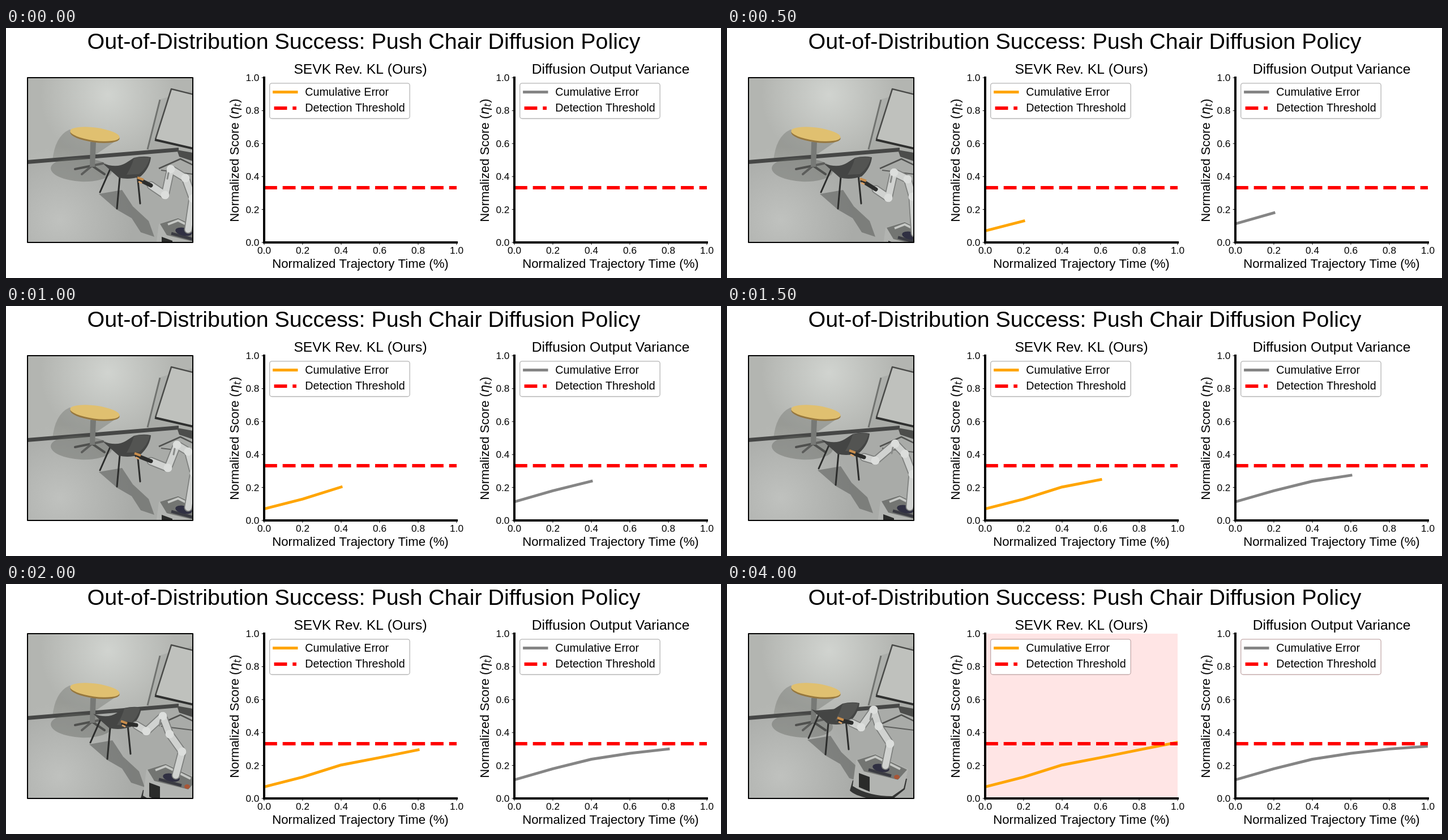
An HTML page with a canvas for the animation above (5000 ms loop, 1263x443 px).

```html
<!DOCTYPE html>
<html lang="en">
<head>
<meta charset="utf-8">
<title>Push chair policy</title>
<style>
html, body { margin: 0; width: 100%; height: 100%; overflow: hidden; background: #fff; }
canvas { display: block; }
</style>
</head>
<body>
<canvas id="stage" width="1263" height="443"></canvas>
<script>
const ctx = document.getElementById('stage').getContext('2d');
const SANS = '"Liberation Sans", Arial, sans-serif';
const MATH = 'italic "DejaVu Sans", sans-serif';
const LOOP = 5000, STEP = 500, LAST = 5;
const W = 340, H = 292, TOP = 88, BOTTOM = 380;
const PT = 1.233; // pixels per point
const DASH = [18.5 * PT, 8 * PT];

const charts = [
  { x: 456, title: 'SEVK Rev. KL (Ours)', color: '#ffa500', alarm: true,
    data: [.07, .13, .203, .248, .295, .341] },
  { x: 898, title: 'Diffusion Output Variance', color: '#858585',
    data: [.113, .18, .238, .274, .3, .317] }
];

// One pose per step: chair offset, base offset, arm joints from the gripper on
const poses = [
  { chair: [0, 0], base: [42, 35], arm: [[236, 269], [256, 279], [281, 296], [291, 250], [317, 266], [330, 302]] },
  { chair: [0, 0], base: [52, 42], arm: [[239, 271], [263, 286], [285, 301], [295, 256], [319, 268], [328, 299]] },
  { chair: [0, 0], base: [42, 35], arm: [[231, 265], [256, 275], [286, 287], [302, 246], [322, 258], [332, 296]] },
  { chair: [-4, -3], base: [43, 34], arm: [[220, 260], [242, 268], [262, 274], [297, 244], [314, 262], [328, 298]] },
  { chair: [-17, -10], base: [20, 17], arm: [[207, 247], [230, 250], [248, 261], [277, 234], [289, 266], [311, 297]] },
  { chair: [-22, -18], base: [0, 0], arm: [[199, 241], [220, 246], [237, 254], [259, 223], [268, 252], [288, 283]] }
];

function line(points, color, width, cap = 'butt', dash = []) {
  ctx.beginPath();
  points.forEach(p => ctx.lineTo(...p));
  ctx.strokeStyle = color;
  ctx.lineWidth = width;
  ctx.lineCap = cap;
  ctx.lineJoin = 'round';
  ctx.setLineDash(dash);
  ctx.stroke();
  ctx.setLineDash([]);
}

function fill(path, color) {
  ctx.fillStyle = color;
  ctx.fill(new Path2D(path));
}

function oval(x, y, rx, ry, turn, color) {
  ctx.beginPath();
  ctx.ellipse(x, y, rx, ry, turn, 0, 7);
  ctx.fillStyle = color;
  ctx.fill();
}

function text(str, x, y, size, align = 'center', italic = false) {
  ctx.font = italic ? MATH.replace(' ', ` ${size}px `) : `${size}px ${SANS}`;
  ctx.textAlign = align;
  ctx.fillStyle = '#000';
  ctx.fillText(str, x, y);
  return ctx.measureText(str).width;
}

function glow(x, y, r, rgb, alpha) {
  const g = ctx.createRadialGradient(x, y, 0, x, y, r);
  g.addColorStop(0, `rgba(${rgb},${alpha})`);
  g.addColorStop(1, `rgba(${rgb},0)`);
  ctx.fillStyle = g;
  ctx.fillRect(38, 88, 292, 292);
}

function room() {
  fill('M38 88H330V380H38Z', '#b3b5b1');
  glow(180, 118, 120, '212,215,211', .9);
  fill('M273 126L330 110V222L250 218Z', 'rgba(150,152,148,.35)');
  // Wall shadow, floor and skirting
  fill('M112 180Q86 192 82 236L150 230L200 196Z', 'rgba(110,112,108,.4)');
  fill('M38 240L305 217L330 219V380H38Z', '#a9aba8');
  glow(95, 340, 130, '194,196,193', .9);
  fill('M38 234L305 212V219L38 241Z', '#464746');
  line([[272, 127], [250, 215]], '#70726f', 3);
  // Board with its stand
  fill('M292 108L330 117V213L264 197Z', '#bfc1bd');
  line([[332, 118], [292, 108], [264, 197]], '#4a4b49', 2.5);
  line([[263, 198], [332, 214]], '#2f302f', 4);
  fill('M302 216L330 221V236L306 228Z', '#4c4d4b');
  line([[270, 249], [308, 232], [331, 243]], '#50514f', 2.5);
  line([[274, 252], [330, 259]], '#5c5d5b', 2);
}

function table() {
  oval(133, 251, 54, 21, .05, 'rgba(95,97,94,.4)');
  line([[122, 250], [152, 244], [174, 259]], '#4f504e', 4, 'round');
  line([[134, 259], [152, 244], [171, 240]], '#5c5d5b', 4, 'round');
  fill('M149 202H159L157 246H148Z', '#777976');
  oval(157, 190.5, 44, 12, .13, '#96773e');
  oval(157, 188, 44, 11.5, .13, '#e0c070');
}

function chair([dx, dy]) {
  ctx.save();
  ctx.translate(dx, dy);
  fill('M164 294L205 287L224 316L252 342L262 370L238 362L222 337L196 322Z', 'rgba(80,82,80,.5)');
  line([[184, 250], [166, 291]], '#2c2d2c', 3, 'round');
  line([[201, 264], [196, 320]], '#2c2d2c', 3, 'round');
  line([[232, 260], [237, 311]], '#2c2d2c', 3, 'round');
  fill('M171 240Q196 249 212 239L226 230Q242 226 256 229Q254 248 238 263Q217 270 199 265Q182 250 171 240Z', '#444544');
  fill('M226 231Q242 227 254 230Q250 247 235 259L213 260Q221 247 226 231Z', '#535452');
  ctx.restore();
}

function cart([dx, dy]) {
  ctx.save();
  ctx.translate(dx, dy);
  fill('M222 348L217 366Q230 380 288 385L314 364L318 345Z', '#343534');
  fill('M228 312L262 301L320 328L312 362L292 376Q250 376 222 358Z', '#b2b4b1');
  fill('M230 312L262 302L318 329L302 347L242 332Z', '#737572');
  fill('M233 335L252 342V368L233 360Z', '#2a2b2a');
  line([[244, 313], [262, 306], [306, 328]], '#c6c8c5', 4);
  line([[250, 329], [290, 340]], '#3a3b42', 5);
  oval(272, 326, 15, 7, .2, '#303042');
  oval(300, 342, 5, 4, 0, '#a85535');
  ctx.restore();
}

function robot({ arm, base }) {
  cart(base);
  const [tip, wrist, ...joints] = arm;
  const links = [wrist, ...joints, [280 + base[0], 322 + base[1]]];
  line(links, '#7d7f7d', 15, 'round');
  line(links, '#d0d2d0', 11.5, 'round');
  joints.forEach(([x, y]) => oval(x, y, 7.5, 7.5, 0, '#dcdedc'));
  const [ex, ey] = joints[1];
  line([[ex - 4, ey + 7], [ex - 6, ey + 17]], '#888a88', 3, 'round');
  line([tip, wrist], '#2c2d2c', 7, 'round');
  line([[tip[0] - 4, tip[1] - 4], [tip[0] + 7, tip[1]]], '#c88d4c', 4);
  line([[tip[0] - 2, tip[1] + 3], [tip[0] + 4, tip[1] + 6]], '#d9a269', 3);
}

function photo(step) {
  ctx.save();
  ctx.beginPath();
  ctx.rect(38, 88, 292, 292);
  ctx.clip();
  room();
  table();
  chair(poses[step].chair);
  robot(poses[step]);
  ctx.restore();
  ctx.strokeStyle = '#000';
  ctx.lineWidth = 2;
  ctx.strokeRect(38, 88, 292, 292);
}

function legend(x, color, alarm) {
  ctx.beginPath();
  ctx.roundRect(x + 9.7, 97.8, 247.5, 62.7, 4);
  ctx.fillStyle = '#fff';
  ctx.fill();
  ctx.strokeStyle = alarm ? '#c3a9a9' : '#b4b4b4';
  ctx.lineWidth = 1.3;
  ctx.stroke();
  line([[x + 17.6, 113.5], [x + 57, 113.5]], color, 5, 'square');
  line([[x + 17.6, 142], [x + 57, 142]], '#f00', 6, 'butt', DASH);
  text('Cumulative Error', x + 72.2, 120, 16 * PT, 'left');
  text('Detection Threshold', x + 72.2, 148.3, 16 * PT, 'left');
}

function scoreLabel(x) {
  ctx.save();
  ctx.translate(x, 343.7);
  ctx.rotate(-Math.PI / 2);
  const size = 18 * PT;
  let pos = text('Normalized Score (', 0, 0, size, 'left');
  pos += text('η', pos, 0, size, 'left', true);
  pos += text('t', pos, 3.4, size * .7, 'left', true) + .8;
  text(')', pos, 0, size, 'left');
  ctx.restore();
}

function chart({ x, title, color, data, alarm }, step) {
  const done = step === LAST;
  if (alarm && done) fill(`M${x} ${TOP}h${W}v${H}h${-W}Z`, '#ffe5e5');
  ctx.save();
  ctx.beginPath();
  ctx.rect(x, TOP, W, H);
  ctx.clip();
  if (step) {
    const points = data.slice(0, step + 1).map((v, i) => [x + i * W / 5, BOTTOM - v * H]);
    line(points, color, 4 * PT, 'square');
  }
  line([[x, 283], [x + W, 283]], '#f00', 6, 'butt', DASH);
  ctx.restore();
  legend(x, color, done);

  for (let i = 0; i <= 5; i++) {
    const tx = x + i * W / 5, ty = BOTTOM - i * H / 5, label = (i / 5).toFixed(1);
    line([[tx, BOTTOM], [tx, BOTTOM + 4.3]], '#000', 1);
    line([[x, ty], [x - 4.3, ty]], '#000', 1);
    text(label, tx, 399.8, 14 * PT);
    text(label, x - 8.6, ty + 6, 14 * PT, 'right');
  }
  line([[x, TOP], [x, BOTTOM]], '#000', 4, 'square');
  line([[x, BOTTOM], [x + W, BOTTOM]], '#000', 4, 'square');
  text(title, x + W / 2, 80.6, 20 * PT);
  text('Normalized Trajectory Time (%)', x + W / 2, 425.3, 18 * PT);
  scoreLabel(x - 45.5);
}

function draw() {
  const step = Math.min(LAST, Math.floor(performance.now() % LOOP / STEP));
  ctx.fillStyle = '#fff';
  ctx.fillRect(0, 0, 1263, 443);
  text('Out-of-Distribution Success: Push Chair Diffusion Policy', 632, 37.3, 32 * PT);
  photo(step);
  charts.forEach(c => chart(c, step));
  requestAnimationFrame(draw);
}
draw();
</script>
</body>
</html>
```
